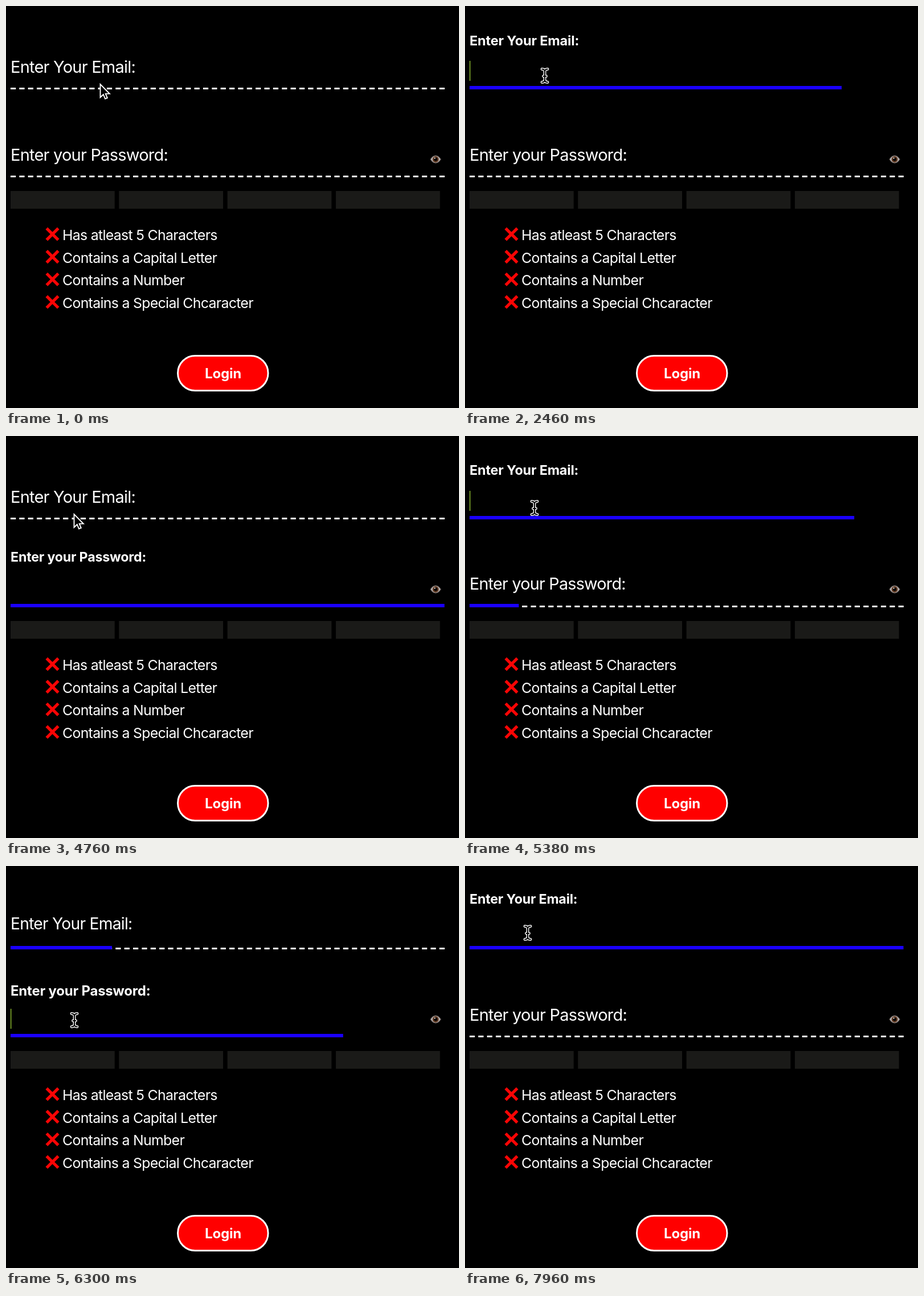
Write an HTML page that moves like this. It is 795 px wide and 704 px high and loops after 8 s.

```html
<!DOCTYPE html>
<html lang="en">
<head>
<meta charset="utf-8">
<title>Login form</title>
<style>
  html, body { margin: 0; width: 100%; height: 100%; overflow: hidden; background: #000; }
  svg { display: block; width: 795px; height: 704px; }
  text {
    fill: #fff;
    font-family: Inter, Roboto, sans-serif;
    font-optical-sizing: none;
    font-size: 24.8px;
    letter-spacing: -.027em;
  }
  .bold { font-weight: 700; letter-spacing: -.008em; }
  .login { font-size: 24px; }
  .dashes { stroke: #fff; stroke-width: 3; stroke-dasharray: 9.15 6.21; }
  .bar { fill: #1a1a18; }
  .cross { stroke: #fb0505; stroke-width: 5.2; }
  .pointer { fill: #000; stroke: #fff; stroke-width: 1.9; }
  .beam { fill: none; stroke: #fff; stroke-width: 4.8; stroke-linecap: round; }
  .beam .core { stroke: #000; stroke-width: 2; }
</style>
</head>
<body>
<svg id="stage" viewBox="0 0 795 704">
  <defs>
    <path id="beamShape" d="M-5 -11.5Q0 -11.5 0 -7V7Q0 11.5 -5 11.5M5 -11.5Q0 -11.5 0 -7M0 7Q0 11.5 5 11.5M-2.5 1H2.5"/>
  </defs>
  <g id="fields"></g>
  <g id="eye" transform="translate(754 268.5)">
    <path d="M-9 0Q-5 -6.5 0 -6.5T9 0Q5 6.5 0 6.5T-9 0Z" fill="#bdb8b8" stroke="#6b625f" stroke-width="1.2"/>
    <circle r="5.4" fill="#5f3820"/>
    <circle r="3" fill="#080504"/>
    <circle cx="-1.5" cy="-2" r="1.1" fill="#fff"/>
  </g>
  <g id="rules"></g>
  <rect x="301.5" y="612.5" width="158.5" height="61" rx="30.5" fill="#f00" stroke="#fff" stroke-width="3"/>
  <text class="bold login" x="381" y="652" text-anchor="middle">Login</text>
  <g id="cursor">
    <path class="pointer" d="M.5 1V24L5.8 19L9 26.5L12.8 25L9.7 17.6H16.8Z"/>
    <g class="beam"><use href="#beamShape"/><use href="#beamShape" class="core"/></g>
  </g>
</svg>
<script>
const LOOP = 8000, LABEL_MS = 400, LINE_MS = 500, BLINK_MS = 530;
const LINE_WIDTH = 761.5;
const byId = id => document.getElementById(id);

// Moments at which a field gains focus: 0 is the email, 1 the password.
const focusEvents = [[2180, 0], [3724, 1], [5080, 0], [6068, 1], [7050, 0]];

// Mouse stops: time, x, y.
const mousePath = [
  [0, 165, 136], [500, 155, 117], [1000, 152, 117], [1600, 144, 117],
  [2100, 140, 122], [3000, 140, 122], [3600, 135, 262], [4000, 135, 262],
  [4600, 119, 136], [4800, 119, 136], [5050, 122, 126], [5450, 122, 126],
  [5950, 120, 270], [6400, 120, 270], [6950, 110, 117], [8000, 110, 117]
];

const fields = ["Enter Your Email:", "Enter your Password:"].map((name, i) => {
  const group = document.createElementNS("http://www.w3.org/2000/svg", "g");
  group.setAttribute("transform", `translate(8 ${i * 154})`);
  group.innerHTML = `
    <path class="dashes" d="M0 144.5H762"/>
    <rect class="line" y="140" height="6" fill="#1a00ff"/>
    <rect class="caret" y="96" width="1.3" height="35" fill="#9acd32"/>
    <text class="label">${name}</text>`;
  byId("fields").append(group);
  const part = cls => group.querySelector("." + cls);
  return { dashes: part("dashes"), line: part("line"), caret: part("caret"), label: part("label") };
});

byId("rules").innerHTML =
  [0, 1, 2, 3].map(i => `<rect class="bar" x="${8 + i * 190.3}" y="324" width="182.7" height="31"/>`).join("") +
  ["Has atleast 5 Characters", "Contains a Capital Letter", "Contains a Number", "Contains a Special Chcaracter"]
    .map((rule, i) => `<g transform="translate(0 ${i * 39.6})">
      <path class="cross" d="M71.3 389.3L91.7 409.7M91.7 389.3L71.3 409.7"/>
      <text x="99" y="410.3">${rule}</text></g>`).join("");

// The CSS "ease" curve, cubic-bezier(.25, .1, .25, 1).
function ease(x) {
  if (x <= 0) return 0;
  if (x >= 1) return 1;
  const bezier = (a, b, s) => 3 * a * s * (1 - s) ** 2 + 3 * b * s * s * (1 - s) + s ** 3;
  let low = 0, high = 1;
  for (let i = 0; i < 24; i++) {
    const mid = (low + high) / 2;
    if (bezier(.25, .25, mid) < x) low = mid; else high = mid;
  }
  return bezier(.1, 1, low);
}

const mix = (a, b, p) => a + (b - a) * p;
const show = (node, visible) => node.setAttribute("visibility", visible ? "visible" : "hidden");

function drawField(field, index, time) {
  const past = focusEvents.filter(([start]) => start <= time);
  const [since, current] = past.at(-1) || [0, -1];
  const previous = past.length > 1 ? past.at(-2)[1] : -1;
  const focused = current === index;
  const age = time - since;
  const progress = duration => {
    const p = ease(age / duration);
    return focused ? p : previous === index ? 1 - p : 0;
  };

  const lift = progress(LABEL_MS);
  field.label.style.fontSize = mix(29, 23.2, lift) + "px";
  field.label.setAttribute("y", mix(117.2, 66.4, lift));
  field.label.classList.toggle("bold", focused);
  field.line.setAttribute("width", LINE_WIDTH * progress(LINE_MS));
  show(field.dashes, !focused);
  show(field.caret, focused && age % (2 * BLINK_MS) < BLINK_MS);
}

function drawCursor(time) {
  const next = mousePath.findIndex(([stop]) => stop > time);
  const [t0, x0, y0] = mousePath[next - 1], [t1, x1, y1] = mousePath[next];
  const s = (time - t0) / (t1 - t0), p = s * s * (3 - 2 * s);
  const x = mix(x0, x1, p), y = mix(y0, y1, p);
  const overInput = (y > 90 && y < 133) || (y > 244 && y < 287);
  const cursor = byId("cursor");
  cursor.setAttribute("transform", `translate(${x} ${y})`);
  show(cursor.children[0], !overInput);
  show(cursor.children[1], overInput);
}

const startTime = performance.now();
function frame() {
  const time = (performance.now() - startTime) % LOOP;
  fields.forEach((field, i) => drawField(field, i, time));
  drawCursor(time);
  requestAnimationFrame(frame);
}
frame();
</script>
</body>
</html>
```
